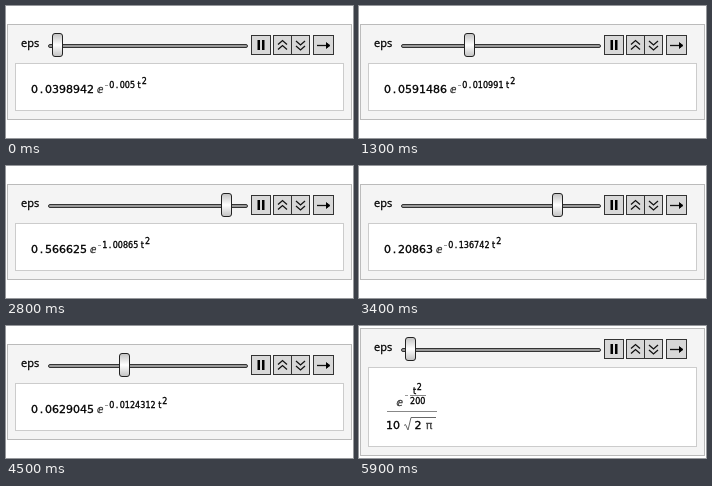
An HTML page with a canvas for the animation above (6 s loop, 347 by 132 pixels).

```html
<!DOCTYPE html>
<html lang="en">
<head>
<meta charset="utf-8">
<title>Gaussian slider</title>
<style>
  html, body { margin: 0; width: 100%; height: 100%; overflow: hidden; background: #fff; }
  canvas { display: block; }
</style>
</head>
<body>
<canvas id="stage" width="347" height="132"></canvas>
<script>
const ctx = document.getElementById('stage').getContext('2d');
const LOOP = 6000, STEP = 100;
const SANS = '"DejaVu Sans", sans-serif';
const BIG = { size: 11, cell: 7 }, SMALL = { size: 8, cell: 5.15 };

function box(x, y, w, h, fill, line) {
  ctx.fillStyle = fill;
  ctx.fillRect(x, y, w, h);
  ctx.strokeStyle = line;
  ctx.lineWidth = 1;
  ctx.strokeRect(x + 0.5, y + 0.5, w - 1, h - 1);
}

function path(points, width = 1, color = '#111') {
  ctx.beginPath();
  points.forEach(([x, y]) => ctx.lineTo(x, y));
  ctx.lineWidth = width;
  ctx.strokeStyle = color;
  ctx.stroke();
}

function pill(x, y, w, h, r, fill, line) {
  ctx.beginPath();
  ctx.roundRect(x + 0.5, y + 0.5, w - 1, h - 1, r);
  ctx.fillStyle = fill;
  ctx.fill();
  ctx.lineWidth = 1;
  ctx.strokeStyle = line;
  ctx.stroke();
}

// Text with a thin outline, a little heavier than the regular weight.
function label(text, x, y, color, outline = 0.3) {
  ctx.fillStyle = ctx.strokeStyle = color;
  ctx.lineWidth = outline;
  ctx.fillText(text, x, y);
  ctx.strokeText(text, x, y);
}

// Fixed-pitch text; returns the x position after the last cell.
function mono(text, x, y, { size, cell }, color = '#000') {
  ctx.font = `${size}px ${SANS}`;
  ctx.textAlign = 'center';
  [...text].forEach((ch, i) => label(ch, x + (i + 0.5) * cell, y, color));
  return x + text.length * cell;
}

function minus(x, y) {
  path([[x, y], [x + 3, y]], 1, '#999');
}

function sliderPosition(time) {
  const tick = Math.floor(time / STEP);
  const k = Math.min(tick - 4, 55 - tick);
  return k < 1 ? 0 : (12 * k - 11) / 295;
}

function drawButtons() {
  for (const [x, w] of [[245, 20], [267, 19], [285, 19], [307, 21]]) {
    box(x, 29, w, 20, '#d8d8d8', '#333');
  }
  ctx.fillStyle = '#000';
  ctx.fillRect(251.5, 34, 2.5, 10);
  ctx.fillRect(256, 34, 2.5, 10);
  for (const y of [38.5, 43.5]) path([[272, y], [276.5, y - 4], [281, y]], 1.3);
  for (const y of [35, 40]) path([[290, y], [294.5, y + 4], [299, y]], 1.3);
  path([[311, 39.5], [322, 39.5]], 1.3);
  path([[320, 36.5], [324, 39.5], [320, 42.5]]);
  ctx.fill();
}

function drawControls(position) {
  ctx.font = '11px "Open Sans", sans-serif';
  ctx.textAlign = 'left';
  label('eps', 15, 41, '#000');

  pill(42, 38, 200, 4, 1.5, '#999', '#333');
  const x = Math.round(46 + 180 * position);
  const shine = ctx.createLinearGradient(0, 28, 0, 50);
  shine.addColorStop(0, '#c4c4c4');
  shine.addColorStop(0.5, '#fff');
  shine.addColorStop(1, '#c4c4c4');
  pill(x, 27, 11, 24, 2.5, shine, '#222');
  drawButtons();
}

function drawNumericFormula(eps) {
  const digits = value => String(Number(value.toPrecision(6)));
  let x = mono(digits(1 / (eps * Math.sqrt(2 * Math.PI))), 25, 87, BIG);
  mono('ⅇ', x + 3, 87, BIG, '#333');
  minus(x + 11, 79.5);
  x = mono(digits(1 / (2 * eps * eps)), x + 15.3, 82, SMALL);
  x = mono('t', x + 1.5, 82, SMALL);
  mono('2', x, 78, SMALL);
}

function drawExactFormula() {
  mono('ⅇ', 37.5, 80, BIG, '#333');
  minus(46, 69.5);
  mono('t', 53, 68, SMALL);
  mono('2', 57.7, 64, SMALL);
  path([[51, 69.5], [67, 69.5]], 1, '#888');
  mono('200', 51, 78, SMALL);
  path([[28, 85.5], [78, 85.5]], 1, '#888');
  mono('10', 27, 103, BIG);
  path([[45, 99.5], [46.5, 98.5], [49, 104], [52, 91.5], [77, 91.5]], 1, '#666');
  mono('2', 55.5, 103, BIG);
  mono('π', 66.5, 103, BIG, '#444');
}

function draw(time) {
  const exact = time >= 5900;
  const position = sliderPosition(time);
  const lift = exact ? 16 : 0;
  ctx.fillStyle = '#fff';
  ctx.fillRect(0, 0, 347, 132);
  box(1, 18 - lift, 345, exact ? 128 : 96, '#f4f4f4', '#bbb');
  box(9, 57 - lift, 329, exact ? 80 : 48, '#fff', '#ccc');
  ctx.save();
  ctx.translate(0, -lift);
  drawControls(position);
  ctx.restore();
  if (exact) drawExactFormula();
  else drawNumericFormula(10 - 9.9 * position);
}

const start = performance.now();
function tick() {
  draw((performance.now() - start) % LOOP);
  requestAnimationFrame(tick);
}
tick();
</script>
</body>
</html>
```
